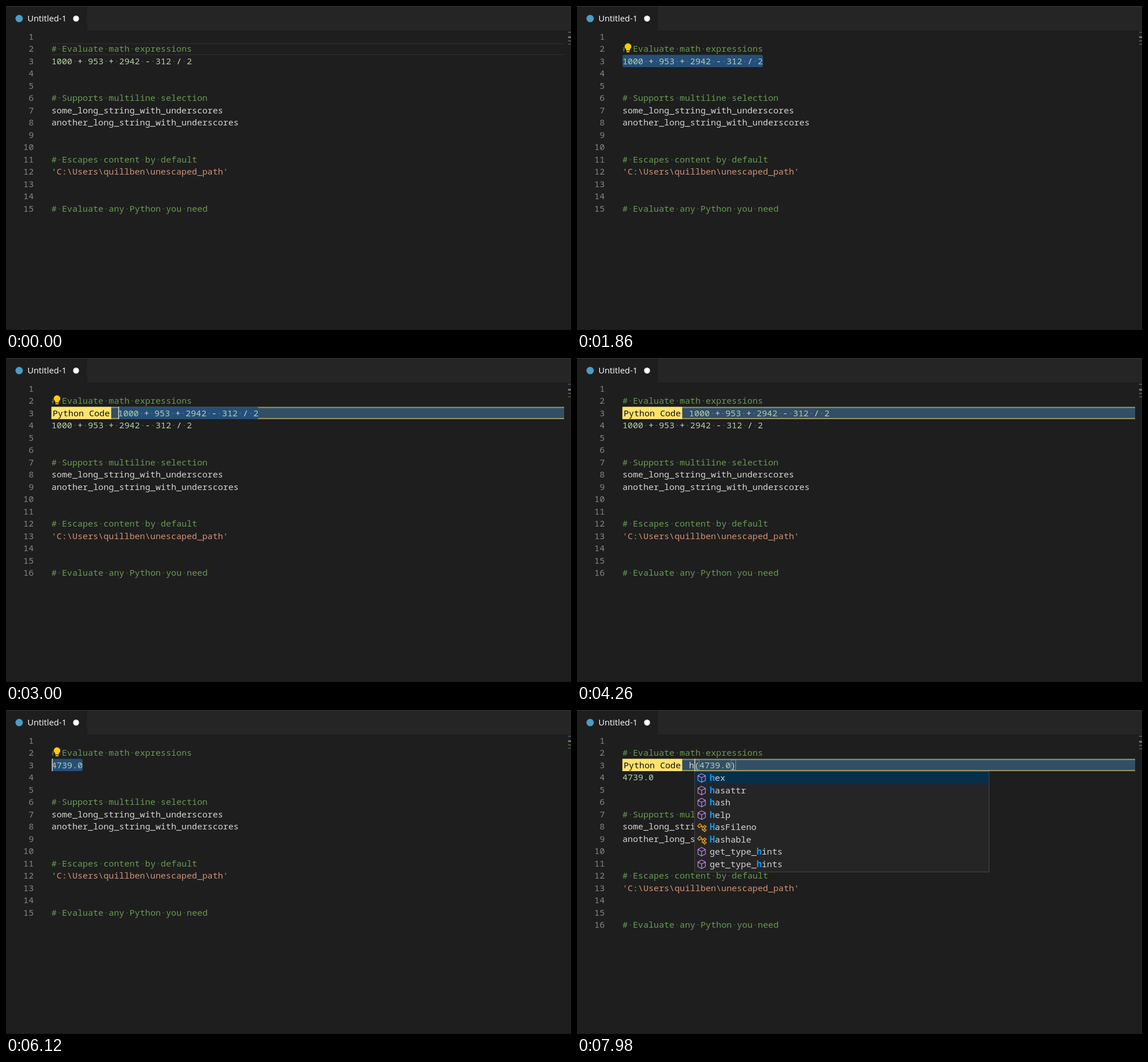
Write an HTML page with a canvas that moves like this. It is 988 px wide and 567 px high and loops after 8 s.

```html
<!DOCTYPE html>
<html lang="en">
<head>
<meta charset="utf-8">
<title>Inline evaluation in an editor</title>
<style>
  html, body { margin: 0; width: 988px; height: 567px; overflow: hidden; background: #1e1e1e; }
  canvas { display: block; }
</style>
</head>
<body>
<canvas id="stage" width="988" height="567"></canvas>
<script>
const ctx = document.getElementById('stage').getContext('2d');
const LOOP = 8000, CHAR = 9.1, ROW = 21.5, LEFT = 79.5, INPUT_LEFT = 195.8, RIGHT = 976;
const MONO = '15.17px "Noto Sans Mono", "DejaVu Sans Mono", monospace';
const BG = '#1e1e1e', PLAIN = '#d4d4d4', NUMBER = '#b5cea8', COMMENT = '#6a9955', STRING = '#ce9178';
const SUM = '1000 + 953 + 2942 - 312 / 2', RESULT = '4739.0';

// Each step overrides the fields of the state before it; caret -1 is hidden.
const steps = [
  [0, { text: SUM, input: '', pushed: 0, current: 2, sel: null, caret: -1, bulb: 0, popup: 0 }],
  [540, { current: 3, caret: 27 }],
  [1020, { caret: -1 }],
  [1380, { current: 0, sel: [0, 27], caret: 0 }],
  [1680, { bulb: 1 }],
  [1860, { caret: -1 }],
  [2220, { pushed: 1, caret: 0 }],
  [2280, { input: SUM, sel: null, bulb: 0, caret: 27 }],
  [2760, { sel: [0, 27], caret: 0 }],
  [3000, { bulb: 1 }],
  [3060, { bulb: 0, input: `(${SUM})`, sel: [1, 28], caret: 1 }],
  [3420, { sel: null, caret: 0 }],
  [3780, { input: SUM }],
  [4260, { caret: -1 }],
  [4380, { input: '', pushed: 0, text: RESULT, current: 3, caret: 6 }],
  [4860, { caret: -1 }],
  [5160, { current: 0, sel: [0, 6], caret: 0 }],
  [5400, { bulb: 1 }],
  [5640, { caret: -1 }],
  [6120, { caret: 0 }],
  [6180, { pushed: 1, input: RESULT, sel: null, bulb: 0, caret: 6 }],
  [6660, { caret: -1 }],
  [7140, { sel: [0, 6], caret: 0 }],
  [7380, { bulb: 1 }],
  [7500, { bulb: 0, input: `(${RESULT})`, sel: [1, 7], caret: 1 }],
  [7920, { sel: null, caret: 0 }],
  [7980, { input: `h(${RESULT})`, caret: 1, popup: 1 }],
];

const stateAt = t => Object.assign({}, ...steps.filter(s => s[0] <= t).map(s => s[1]));
const rowTop = row => 42.5 + ROW * (row - 1);
const baseline = row => Math.round(rowTop(row) + 16);

function rect(x, y, w, h, color) {
  ctx.fillStyle = color;
  ctx.fillRect(x, y, w, h);
}

function disc(x, y, r, color) {
  ctx.fillStyle = color;
  ctx.beginPath();
  ctx.arc(x, y, r, 0, 7);
  ctx.fill();
}

function path(d, color, width) {
  ctx.strokeStyle = color;
  ctx.lineWidth = width;
  ctx.stroke(new Path2D(d));
}

function word(s, x, y, color, weight = 500) {
  ctx.font = weight + ' ' + MONO;
  ctx.fillStyle = color;
  ctx.fillText(s, x, y);
}

function code(s, x, row, color) {
  const y = baseline(row);
  for (const m of s.matchAll(/[\d.]+|[^\s\d.]+|\s/g)) {
    const wx = x + m.index * CHAR;
    if (m[0] === ' ') rect(wx + 3.7, y - 6, 2, 2, 'rgba(227,228,226,.2)');
    else word(m[0], wx, y, color || (/\d/.test(m[0]) ? NUMBER : PLAIN));
  }
}

function drawTabs() {
  rect(0, 0, 988, 43, '#252526');
  rect(0, 0, 142, 43, BG);
  rect(0, 0, 988, 1, '#353535');
  disc(23, 22, 6.5, '#4b9cc6');
  ctx.font = '14.8px "Open Sans", "Noto Sans", sans-serif';
  ctx.fillStyle = '#fff';
  ctx.fillText('Untitled-1', 37.5, 27);
  disc(122.5, 22, 5.2, '#fff');
}

function drawMinimap(s) {
  const low = s.pushed;
  rect(983, 45, 5, 2, s.sel ? '#3c5068' : '#555');
  rect(983, 53 + low, 5, 3, '#777');
  rect(983, 60 + low, 5, 2, '#4c5c48');
  rect(983, 66 + low, 5, 2, '#484848');
}

function drawBulb() {
  rect(83, 65, 13, 17, BG);
  disc(89.2, 71, 5.8, '#fc0');
  rect(86, 74, 6.4, 4, '#fc0');
  rect(86.6, 79, 5.2, 2, '#fc0');
}

function drawPopup() {
  rect(205, 107, 516, 177, '#454545');
  rect(206, 108, 514, 175, '#252526');
  rect(206, 108, 514, 22, '#062f4a');
  const items = ['hex', 'hasattr', 'hash', 'help', 'HasFileno', 'Hashable', 'get_type_hints', 'get_type_hints'];
  items.forEach((item, i) => {
    const y = baseline(i + 4) + 1, hit = item.search(/h/i);
    word(item.slice(0, hit), 232, y, PLAIN);
    word(item[hit], 232 + hit * CHAR, y, '#1297f0', 700);
    word(item.slice(hit + 1), 232 + (hit + 1) * CHAR, y, PLAIN);
    ctx.save();
    ctx.translate(218, y - 5);
    if (/^H/.test(item)) {
      path('M-7-2l4-4 3 3-4 4z M-1-1h4 M1-1v6h2 M3-1l2-2 3 2-3 3z M3 5l2-2 3 2-3 3z', '#ee9d28', 1.4);
    } else {
      path('M0-7.5L6.5-4V4L0 7.5-6.5 4V-4z M-6.5-4L0-.5 6.5-4 M0-.5V7.5', '#b180d7', 1.3);
    }
    ctx.restore();
  });
}

function drawInputBar() {
  const y = rowTop(3);
  rect(LEFT, y, RIGHT - LEFT, 21.5, '#9b985f');
  rect(LEFT, y + 2, RIGHT - LEFT, 17.5, '#324f66');
  rect(LEFT, y, 104.5, 21.5, '#ffe36e');
  word('Python Code', 81.5, baseline(3), '#111');
}

function drawBrackets(s) {
  const open = s.input.indexOf('(');
  if (open < 0 || s.sel) return;
  ctx.strokeStyle = '#888';
  ctx.lineWidth = 1;
  for (const i of [open, s.input.length - 1])
    ctx.strokeRect(Math.round(INPUT_LEFT + i * CHAR) + .5, 87.5, 8, 17);
}

function draw(t) {
  const s = stateAt(t), p = s.pushed;
  const x = s.input ? INPUT_LEFT : LEFT;
  const row = s.input ? 3 : 3 + p;
  rect(0, 0, 988, 567, BG);
  rect(0, 566, 988, 1, '#181818');
  drawTabs();
  drawMinimap(s);

  if (s.current) {
    const y = Math.floor(rowTop(s.current));
    rect(LEFT, y + 1, RIGHT - LEFT, 2, '#282828');
    rect(LEFT, y + 20, RIGHT - LEFT, 2, '#282828');
  }
  if (s.input) drawInputBar();
  if (s.sel) {
    const [from, to] = s.sel;
    ctx.fillStyle = '#264f78';
    ctx.beginPath();
    ctx.roundRect(x + from * CHAR, rowTop(row), (to - from) * CHAR, ROW, 3);
    ctx.fill();
  }
  drawBrackets(s);

  ctx.textAlign = 'right';
  for (let n = 1; n <= 15 + p; n++) word(n, 48.5, baseline(n), '#858585', 400);
  ctx.textAlign = 'left';

  code('# Evaluate math expressions', LEFT, 2, COMMENT);
  code(s.text, LEFT, 3 + p);
  code('# Supports multiline selection', LEFT, 6 + p, COMMENT);
  code('some_long_string_with_underscores', LEFT, 7 + p);
  code('another_long_string_with_underscores', LEFT, 8 + p);
  code('# Escapes content by default', LEFT, 11 + p, COMMENT);
  code("'C:\\Users\\quillben\\unescaped_path'", LEFT, 12 + p, STRING);
  code('# Evaluate any Python you need', LEFT, 15 + p, COMMENT);
  if (s.input) code(s.input, INPUT_LEFT, 3);

  if (s.bulb) drawBulb();
  if (s.caret >= 0) rect(Math.round(x + s.caret * CHAR), Math.floor(rowTop(row)), 2, 22, '#aeafad');
  if (s.popup) drawPopup();
}

const started = performance.now();
function tick() {
  draw((performance.now() - started) % LOOP);
  requestAnimationFrame(tick);
}
tick();
</script>
</body>
</html>
```
